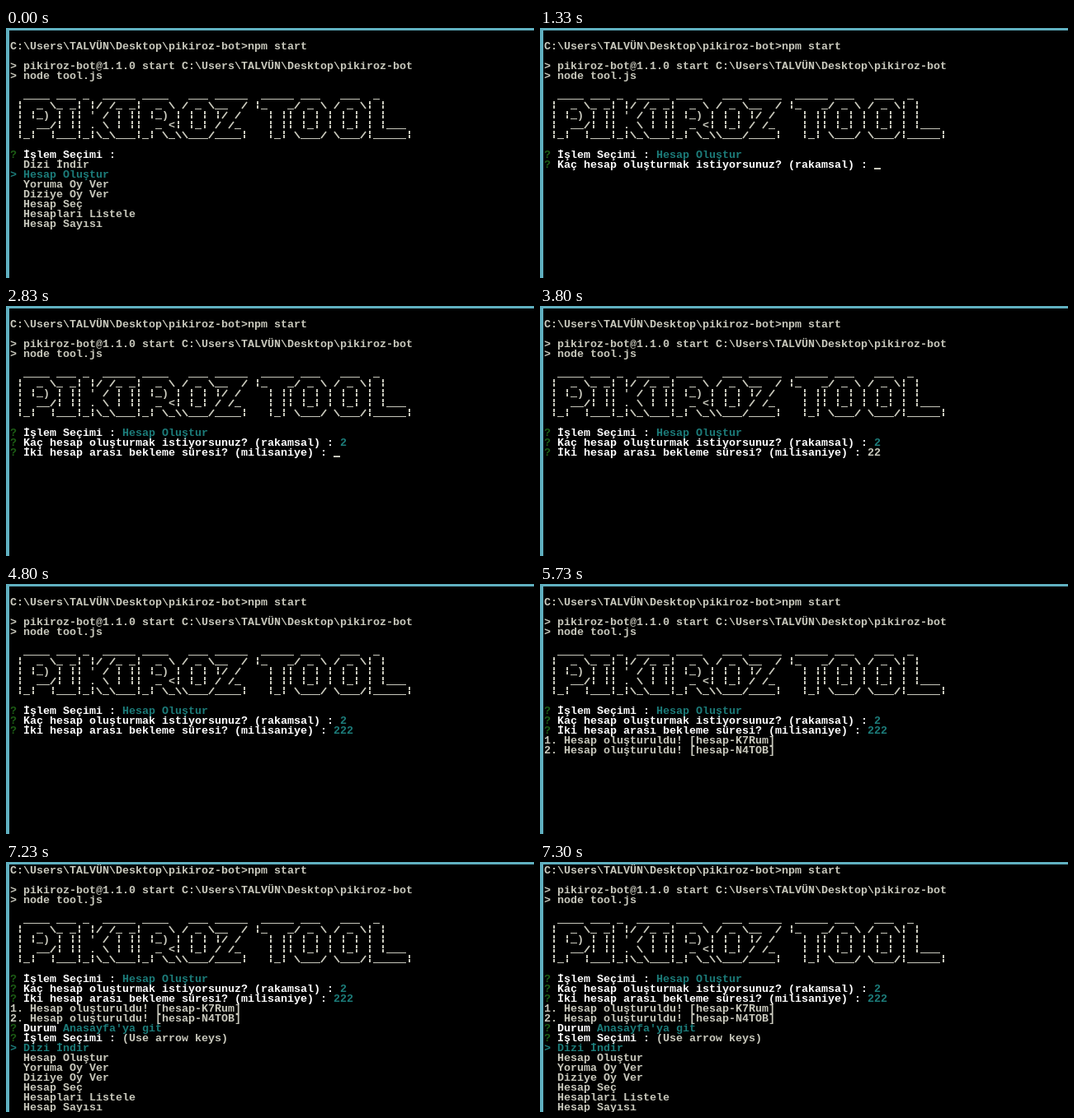
Animation, 640 px wide and 304 px high, one loop 8000 ms. Source, as an HTML page with a canvas:

```html
<!DOCTYPE html>
<html lang="tr">
<head>
<meta charset="utf-8">
<title>Terminal</title>
<style>
  html, body { margin: 0; width: 100%; height: 100%; overflow: hidden; background: #000; }
  canvas { display: block; }
</style>
</head>
<body>
<canvas id="stage" width="640" height="304"></canvas>
<script>
const ctx = document.getElementById('stage').getContext('2d');
const LOOP = 8000;
const CELL_W = 8, ROW_H = 12, LEFT = 5, TOP = 16;
const FONT = 'bold 13.333px "Liberation Mono", monospace';
const GREY = '#c8c8bc', WHITE = '#fff', GREEN = '#1c5c14', TEAL = '#1c7c7a', FRAME = '#60b0c0';

const TIME = {
  count: 1330, countKey: 2670, delay: 2830, delayKeys: [3600, 3720, 4000],
  work: 4700, first: 5000, second: 5730, idle: 6170, status: 6500, home: 7230
};

const HEADER = [
  String.raw`C:\Users\TALVÜN\Desktop\pikiroz-bot>npm start`,
  '',
  String.raw`> pikiroz-bot@1.1.0 start C:\Users\TALVÜN\Desktop\pikiroz-bot`,
  '> node tool.js',
  ''
];
const BANNER = [
  String.raw` ____ ___ _  _____ ____   ___ _____  _____ ___   ___  _`,
  String.raw`|  _ \_ _| |/ /_ _|  _ \ / _ \__  / |_   _/ _ \ / _ \| |`,
  String.raw`| |_) | || ' / | || |_) | | | |/ /    | || | | | | | | |`,
  String.raw`|  __/| || . \ | ||  _ <| |_| / /_    | || |_| | |_| | |___`,
  String.raw`|_|  |___|_|\_\___|_| \_\\___/____|   |_| \___/ \___/|_____|`
];
const ACTIONS = ['Dizi İndir', 'Hesap Oluştur', 'Yoruma Oy Ver', 'Diziye Oy Ver',
  'Hesap Seç', 'Hesapları Listele', 'Hesap Sayısı'];
const HINT = '(Use arrow keys)';

// A row is a list of [text, colour] runs.
const plain = text => [[text, GREY]];
const ask = (question, answer = '', colour = TEAL) =>
  [['? ', GREEN], [question + ' ', WHITE], [answer, colour]];
const menu = (items, selected) => items.map((item, i) =>
  i === selected ? [['> ' + item, TEAL]] : plain('  ' + item));

// The cursor flips about three times a second, after a longer first showing.
const cursorOn = t => t < 1730 || Math.floor((t - 1730) / 342.4) % 2 === 1;

function dialogue(t) {
  const action = 'İşlem Seçimi :';
  if (t < TIME.count) return { rows: [ask(action), ...menu(ACTIONS, 1)] };

  const rows = [ask(action, ACTIONS[1])];
  const count = 'Kaç hesap oluşturmak istiyorsunuz? (rakamsal) :';
  if (t < TIME.delay) {
    rows.push(ask(count, t < TIME.countKey ? '' : '2', GREY));
    return { rows, cursor: cursorOn(t) };
  }
  rows.push(ask(count, '2'));

  const delay = 'İki hesap arası bekleme süresi? (milisaniye) :';
  if (t < TIME.work) {
    const typed = '2'.repeat(TIME.delayKeys.filter(key => t >= key).length);
    rows.push(ask(delay, typed, GREY));
    return { rows, cursor: cursorOn(t) };
  }
  rows.push(ask(delay, '222'));

  if (t >= TIME.first) rows.push(plain('1. Hesap oluşturuldu! [hesap-K7Rum]'));
  if (t >= TIME.second) rows.push(plain('2. Hesap oluşturuldu! [hesap-N4TOB]'));
  if (t < TIME.status) {
    if (t >= TIME.idle) rows.push(plain(''));
    return { rows, cursor: t >= TIME.idle };
  }

  const choices = ["Anasayfa'ya git", 'Çıkış yap'];
  if (t < TIME.home) rows.push(ask('Durum', HINT, GREY), ...menu(choices, 0));
  else rows.push(ask('Durum', choices[0]), ask(action, HINT, GREY), ...menu(ACTIONS, 0));
  return { rows };
}

function drawRow(runs, y) {
  let col = 0;
  for (const [text, colour] of runs) {
    ctx.fillStyle = colour;
    ctx.fillText(text, LEFT + col * CELL_W, y + 10);
    col += text.length;
  }
  return LEFT + col * CELL_W;
}

function stroke(x1, y1, x2, y2) {
  ctx.beginPath();
  ctx.moveTo(x1, y1);
  ctx.lineTo(x2, y2);
  ctx.stroke();
}

function drawBannerCell(char, x, y) {
  if (char === '_') ctx.fillRect(x, y + 10, CELL_W, 1);
  else if (char === '|') {
    ctx.fillRect(x + 3, y + 1, 2, 4);
    ctx.fillRect(x + 3, y + 6, 2, 4);
  }
  else if (char === '/') stroke(x + 7, y + 2, x + 1, y + 10);
  else if (char === '\\') stroke(x + 1, y + 2, x + 7, y + 10);
  else if (char !== ' ') ctx.fillText(char, x, y + 10);
}

function drawBanner(y) {
  ctx.fillStyle = ctx.strokeStyle = GREY;
  ctx.lineWidth = 1.7;
  BANNER.forEach((line, row) => [...line].forEach((char, col) =>
    drawBannerCell(char, LEFT + (col + 1) * CELL_W, y + row * ROW_H)));
}

function render(t) {
  ctx.fillStyle = '#000';
  ctx.fillRect(0, 0, 640, 304);
  ctx.font = FONT;

  let y = TOP - (t >= TIME.home ? ROW_H : 0);
  for (const line of HEADER) {
    drawRow(plain(line), y);
    y += ROW_H;
  }
  drawBanner(y);
  y += (BANNER.length + 1) * ROW_H;

  const { rows, cursor } = dialogue(t);
  let end = LEFT;
  for (const row of rows) {
    end = drawRow(row, y);
    y += ROW_H;
  }
  if (cursor) {
    ctx.fillStyle = GREY;
    ctx.fillRect(end, y - 2, CELL_W, 2);
  }

  ctx.fillStyle = FRAME;
  ctx.fillRect(0, 0, 4, 304);
  ctx.fillRect(0, 0, 640, 3);
}

const start = performance.now();
function tick() {
  render((performance.now() - start) % LOOP);
  requestAnimationFrame(tick);
}
tick();
</script>
</body>
</html>
```
